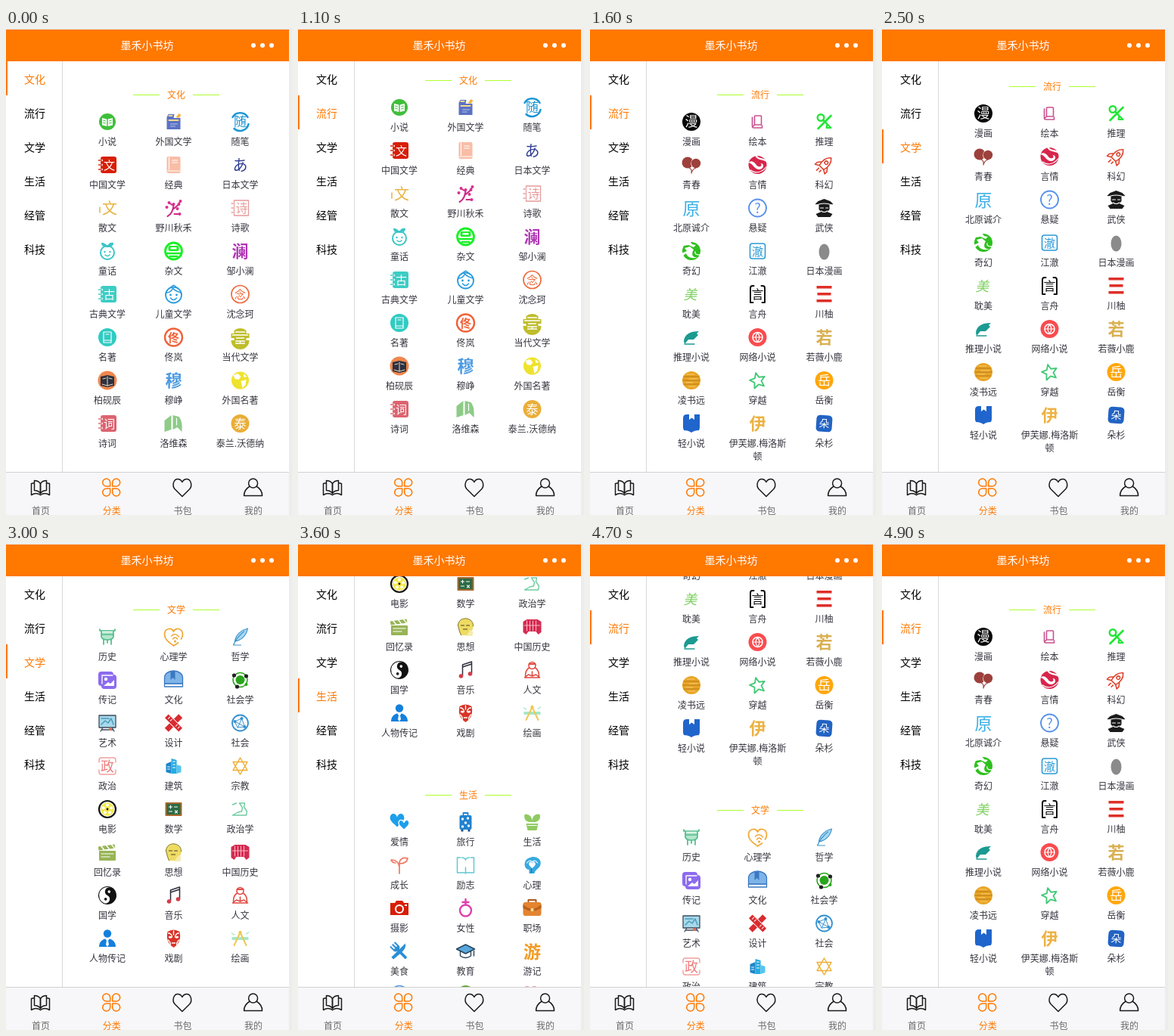
Recreate the animation shown at these times as an HTML page. Size 378 by 644 pixels, loop 6200 ms.

```html
<!DOCTYPE html>
<html lang="zh-CN">
<head>
<meta charset="utf-8">
<style>
html, body { margin: 0; width: 100%; height: 100%; overflow: hidden; background: #ececec; }
svg { display: block; width: 100%; height: 100%; }
text { font-family: "Noto Sans CJK SC", "Noto Sans CJK", "Noto Sans", sans-serif; text-anchor: middle; }
</style>
</head>
<body>
<svg id="stage" viewBox="0 0 378 644"></svg>
<script>
const LOOP = 6200, STEP = 100, PAGE_H = 543, ORANGE = '#ff7800', W = '#fff';

// Shape helpers; icons are drawn around 0,0 within about 12 units
const P = (d, c) => `<path d="${d}" fill="${c}"/>`;
const L = (d, c, w = 1.5) => `<path d="${d}" fill="none" stroke="${c}" stroke-width="${w}" stroke-linecap="round" stroke-linejoin="round"/>`;
const C = (x, y, r, c) => `<circle cx="${x}" cy="${y}" r="${r}" fill="${c}"/>`;
const O = (x, y, r, c, w = 1.5) => `<circle cx="${x}" cy="${y}" r="${r}" fill="none" stroke="${c}" stroke-width="${w}"/>`;
const R = (x, y, w, h, c, r = 0) => `<rect x="${x}" y="${y}" width="${w}" height="${h}" rx="${r}" fill="${c}"/>`;
const G = (tf, s) => `<g transform="${tf}">${s}</g>`;
const text = (s, x, y, size, c, bold = 400) =>
  `<text x="${x}" y="${y + size * .38}" font-size="${size}" font-weight="${bold}" fill="${c}">${s}</text>`;
const T = (s, size, c, bold = 400, x = 0) => text(s, x, 0, size, c, bold);
const at = (x, y, s) => G(`translate(${x} ${y})`, s);
const spin = (a, s) => G(`rotate(${a})`, s);
const mirror = s => s + G('scale(-1 1)', s);

const heart = (x, y, s) => {
  const n = (...v) => v.map(k => (k * s).toFixed(2)).join(' ');
  return `M${x} ${y + s}c${n(-.5, -.5, -1.1, -.9, -1.1, -1.4)}c${n(0, -.8, .9, -.9, 1.1, -.1)}` +
    `c${n(.2, -.8, 1.1, -.7, 1.1, .1)}c${n(0, .5, -.6, .9, -1.1, 1.4)}z`;
};
const disc = (ch, c, size = 16, r = 12) => C(0, 0, r, c) + T(ch, size, W);
const ring = (ch, c, w = 1.5, bold = 400, size = 15) => O(0, 0, 11.5, c, w) + T(ch, size, c, bold);
const binding = c => [-6, 0, 6].map(y => R(-12, y - 1.2, 6, 2.4, W, 1) + R(-12, y - .7, 5, 1.4, c)).join('');
const notebook = (ch, c) => R(-9, -11, 21, 22, c, 3) + binding(c) + T(ch, 15, W, 500, 2.5);

const pages = [
  ['文化', [
    ['小说', C(0, 0, 11, '#3fbf3a') + P('M-7-5L-.7-3.5V6L-7 4.5ZM7-5L.7-3.5V6L7 4.5Z', W) + mirror(L('M-5.5-2L-2.5-1M-5.5 1L-2.5 2', '#3fbf3a', 1))],
    ['外国文学', P('M-9-6L-7-10H1L0-5H9V10H-9Z', '#5b72c4') + P('M3-6L7-11L10-9L7-5Z', '#f2b54a') + L('M-6-8H-2M-6-2H6', '#f6d98b', 2) + L('M-4 3H5M-4 6H2', '#b9c5f0', 1)],
    ['随笔', L('M-10-6A11.5 11.5 0 0 1 10-6M11 3A11.5 11.5 0 0 1-8 9', '#1c96d4', 2.5) + T('随', 17, '#1c96d4', 500)],
    ['中国文学', notebook('文', '#d81e06')],
    ['经典', R(-9, -11, 18, 22, '#f9bda6', 2) + L('M-6-10V6M-2-6H5M-2-3H5M-8 8H8', W, 1.2)],
    ['日本文学', T('あ', 20, '#2f3d91', 500)],
    ['散文', T('文', 20, '#e8b23f', 500, 3) + L('M-10-1V6', '#e8b23f', 1.5)],
    ['野川秋禾', L('M-8 11C-2 8-1 2 0-3L-5-6M-1 2L6-4L9-9M1 8H6', '#c92a86', 2) + [[-6, -7], [-9, -1], [0, -5], [7, -5], [9, -9], [5, 1], [8, 8]].map(p => C(...p, 2, '#d9308f')).join('')],
    ['诗歌', L('M-8-10H11V10H-8Z', '#e69a9a', 1.3) + binding('#e69a9a') + T('诗', 16, '#e69a9a', 400, 2)],
    ['童话', O(0, 2, 9, '#3cc4c8', 2) + P('M0-5C-6-5-8-8-8-11C-4-11-1-9 0-6C1-10 4-12 8-11C8-7 5-5 0-5Z', '#3cc4c8') + mirror(C(-3.5, 1, 1.2, '#3cc4c8')) + L('M-3 5Q0 8 3 5', '#3cc4c8')],
    ['杂文', O(0, 0, 11, '#19f026', 2.8) + R(-7, -7, 14, 7, '#19f026', 2) + R(-4, -5, 8, 2.5, W) + L('M-9 3H9M-5 7H5', '#19f026', 2.4)],
    ['邹小澜', T('澜', 22, '#b034b4', 700)],
    ['古典文学', notebook('古', '#3dcdc4')],
    ['儿童文学', O(0, 1, 10.5, '#2a9bdd', 1.8) + L('M-10-2C-5-2-2-5-1-8C2-4 6-3 10-2M-3-10L0-12L3-10M-4 5Q0 10 4 5', '#2a9bdd') + mirror(C(-4, 1, 1.4, '#2a9bdd'))],
    ['沈念珂', ring('念', '#ef693b', 1.7)],
    ['名著', C(0, 0, 12, '#30cbc2') + L('M-5-7H5V7H-5ZM-5 4H5M-2-4H2', W, 1.2)],
    ['佟岚', ring('佟', '#f0623a', 2.4, 700)],
    ['当代文学', P('M-8-9A12 12 0 0 1 8-9V-5H12V1H8V4H12A12 12 0 0 1-12 4H-8V1H-12V-5H-8Z', '#bfbd2b') + L('M-6-7H6M-10-3H10M-5 1H5M-6 5H6M-6 8H6M0 5V8', W, 1.3)],
    ['柏砚辰', C(0, 0, 12.5, '#f0874d') + P('M-9-5L0-7L9-5V7L0 9L-9 7Z', '#2b3140') + L('M0-5V7M-6-2L-2-3M6-2L2-3M-7 5L0 7L7 5', '#f3d9c0', 1)],
    ['穆峥', T('穆', 22, '#4c9be2', 700)],
    ['外国名著', C(0, 0, 11.5, '#eee32c') + P('M-9-7L-3-9L1-5L-2-1L-7-2ZM1 1L8-1L7 6L3 10ZM4-9L9-5L5-4Z', W)],
    ['诗词', notebook('词', '#dc6470')],
    ['洛维森', P('M-12-4L-3-11V8L-12 11ZM-1-11L7-9Q12-4 11 11L5 5L-1 8Z', '#8ecb88') + L('M4-7V2', W, 1.2)],
    ['泰兰.沃德纳', disc('泰', '#eaae38')]
  ]],
  ['流行', [
    ['漫画', disc('漫', '#080808', 17)],
    ['绘本', L('M-3-8H4Q5-8 5-7V4H-4V-7Q-4-8-3-8ZM-7-6V6Q-7 8-5 8H6V5M-4 4L-6 6', '#c9528f', 1.6)],
    ['推理', O(-4.5, -5.5, 4.3, '#22e636', 2.4) + L('M9-8L-8 9M-1-2L3 2', '#22e636', 2.6) + L('M4 3L9 8H3Z', '#22e636', 2)],
    ['青春', C(-5, -3, 7.5, '#9d403c') + C(6, -2, 6.8, W) + C(6, -2, 6.2, '#9d403c') + L('M-3 4Q1 5 0 11M6 4Q1 6 0 11', '#9d403c', 1.2)],
    ['言情', C(0, 0, 12, '#d7264c') + P('M-12-3C-6-2-4 7 3 6C9 5 9-2 4-2C7 1 3 4-1 1C-4-4-8-7-12-3Z', W) + L('M-2-12C1-6 7-9 12-5', W, 2.2) + L('M-9 7C-3 12 6 10 11 3', W, 1.2)],
    ['科幻', spin(45, L('M0-13C6-8 6-2 4 5H-4C-6-2-6-8 0-13ZM-5-1L-9 4V8L-4 5M5-1L9 4V8L4 5M-2 8V12M2 8V11', '#de432d', 1.6) + O(0, -4, 2.2, '#de432d'))],
    ['北原诚介', T('原', 23, '#3db0e6')],
    ['悬疑', ring('?', '#5c93ea', 1.9, 500, 18)],
    ['武侠', P('M0-12L8-9L12-5L7-4V2L4 5L11 8L8 12H-8L-11 8L-4 5L-7 2V-4L-12-5L-8-9Z', '#1b1b1b') + L('M-10-4Q0-8 10-4M-5 0H-1M2 0H5M-4 4Q0 7 4 4', W, 1.2)],
    ['奇幻', C(0, 0, 12, '#2dc01c') + P('M-13 3L-6 0L-9-4L-2-6L3-2C-1 5 2 9 8 8C2 11-6 8-7 3L-12 7Z', W) + P('M-2-13L1-9L6-8L3-5L-4-8L-10-7L-9-12Z', W) + L('M5 1Q4 5 11 5', W, 1.3)],
    ['江澈', L('M-7-10H7Q10-10 10-7V7Q10 10 7 10H-7Q-10 10-10 7V-7Q-10-10-7-10Z', '#2c9bd6', 1.6) + T('澈', 15, '#2c9bd6')],
    ['日本漫画', '<ellipse cy="1" rx="7" ry="10.5" fill="#8b8b8b"/>'],
    ['耽美', G('skewX(-12)', T('美', 18, '#7ed160'))],
    ['言舟', L('M-5-11H-7Q-9.5-11-9.5-8V11H-6M5-11H7Q9.5-11 9.5-8V11H6', '#111', 2) + T('言', 16, '#111', 500)],
    ['川柚', R(-10, -11, 20, 3.5, '#df2f28') + R(-9, -2, 18, 3.5, '#df2f28') + R(-10, 7, 20, 3.5, '#df2f28')],
    ['推理小说', P('M-10 5C-9-4-2-8 10-8L7-5L9-3L3 3H-4L-9 9Z', '#1b9a92') + L('M-9 9H4', '#1b9a92', 1.3)],
    ['网络小说', C(0, 0, 12, '#f94c4f') + O(0, 0, 6.5, W) + L('M-6 0H6M0-6Q-5 0 0 6M0-6Q5 0 0 6', W, 1.2)],
    ['若薇小鹿', T('若', 22, '#d9b052', 700)],
    ['凌书远', C(0, 0, 12, '#e9a424') + L('M-10-5H10M-11 0H11M-10 5H10', '#b87b19', 1.2) + L('M-6-8H4M-3-2H8M-7 3H2M-4 8H5', '#f6cd70', 1)],
    ['穿越', G('rotate(-14) scale(.92)', L('M0-11L3-4L11-3L5 2L7 10L0 6L-7 10L-5 2L-11-3L-3-4Z', '#41c874', 2))],
    ['岳衡', disc('岳', '#ffa70a', 17)],
    ['轻小说', P('M-11-7Q-11-12-6-12H11V6L10 9Q4 9 0 12Q-4 9-10 9L-11 6Z', '#2065cb') + P('M-3-12H4V-5L.5-7.5L-3-5Z', W)],
    ['伊芙娜.梅洛斯|顿', T('伊', 22, '#ecb244', 700)],
    ['朵杉', spin(4, R(-10.5, -11, 21, 22, '#2263c4', 5) + T('朵', 14, W, 500))]
  ]],
  ['文学', [
    ['历史', P('M-8-6H8V0Q6 4 0 4Q-6 4-8 0Z', '#b5e5cd') + L('M-10-8H10M-8-8V0Q-7 4 0 4Q7 4 8 0V-8M-5 4L-5 10M5 4L5 10M0 4V8M-7-3H7M-10-8V-10M10-8V-10', '#4fbd8a', 1.7)],
    ['心理学', L('M6 8L0 12C-5 8-12 4-12-3C-12-11-3-13 0-7C3-13 12-11 12-3Q12 0 10 3', '#f1a93a', 1.8) + L('M-3-1Q2-6 7 0M-1 3Q2-1 5 3', '#f1a93a') + C(2, 6, 1.6, '#f1a93a')],
    ['哲学', P('M10-11C2-9-6-3-7 6C1 5 8-1 10-11Z', '#a9d8f2') + L('M10-11C2-9-6-3-7 6C1 5 8-1 10-11ZM-9 11C-5 2 0-3 5-7M-9 11H1', '#3c94cb', 1.2)],
    ['传记', R(-12, -11, 20, 19, '#8c6bef', 4) + R(-8, -7, 20, 19, '#8c6bef', 4) + L('M-7-6H7M-7-6V5', W, 1.3) + C(-2, -1, 2.2, W) + P('M-5 8L1 3L4 5L9 0V8Z', W)],
    ['文化', P('M-12 6V-3A12 9 0 0 1 12-3V6Z', '#7fb4e8') + L('M-12 9V-3A12 9 0 0 1 12-3V9ZM-12 5H12', '#3a78c2', 1.3) + P('M-4-11H2V0L-1-3L-4 0Z', '#3a78c2')],
    ['社会学', C(0, 0, 6, '#29a51b') + O(0, 0, 9.5, '#29a51b', 1.6) + C(-8, -6, 2.6, '#222') + C(8, -5, 2.6, '#222') + C(-4, 9, 2.6, '#222') + C(8, 6, 2, '#29a51b')],
    ['艺术', R(-11, -10, 22, 16, '#a6d9ec') + L('M-11-10H11V6H-11ZM-6 6L-9 11M6 6L9 11M-8 9H8', '#3f4c5a', 1.3) + L('M-8-6H2M-8 2L-3-3L1 0L5-6L8 2', '#4f9bb8') + C(4, 8, 2, '#e07060')],
    ['设计', spin(45, R(-3.5, -13, 7, 26, '#d92b30')) + spin(-45, R(-4.2, -13, 8.4, 26, W) + R(-3.3, -13, 6.6, 26, '#d92b30') + L('M-1-9H2M-1-5H2M-1 5H2M-1 9H2', W, 1))],
    ['社会', O(0, 0, 10.5, '#3590cf', 1.8) + L('M-7-2L2-6L6 5L-3 6ZM2-6L-3 6M-7-2L6 5', '#3590cf', 1) + C(2, -6, 2, '#3590cf') + C(-7, -2, 2, '#3590cf') + C(6, 5, 2, '#3590cf')],
    ['政治', L('M-11-5V-8Q-11-11-8-11H8Q11-11 11-8V-5M11 5V8Q11 11 8 11H-8Q-11 11-11 8V5', '#f1a0a0', 1.4) + T('政', 18, '#ee7d7d')],
    ['建筑', P('M-10-3L-3-6V10L-10 8Z', '#1c86c9') + P('M-3-10L4-8V10H-3Z', '#27aae2') + P('M4-2L10 0V8L4 10Z', '#56c5ee') + L('M-1-6H2M-1-2H2M-1 2H2M-8 1H-5M-8 4H-5', W, 1)],
    ['宗教', L('M0-11L9.5 5.5H-9.5ZM0 11L9.5-5.5H-9.5Z', '#efaf35', 1.5)],
    ['电影', O(0, 0, 11, '#141414', 2.2) + C(0, 0, 8.8, '#f5e94a') + [0, 72, 144, 216, 288].map(a => spin(a, C(0, -5.5, 2, W))).join('') + C(0, 0, 1.4, '#141414')],
    ['数学', R(-11, -9, 22, 18, '#a8692f', 1) + R(-9, -7, 18, 14, '#2c6a45') + L('M-6-3H-2M-4-5V-1M1-3H5M-6 3H-2M2 2L5 5M5 2L2 5', W, 1.1)],
    ['政治学', L('M-10-6L-5-8M-1-8H6L5-3L9 3L8 8H-10L-3 4L2 3L3-2L-1-8', '#6fcca0', 1.4)],
    ['回忆录', R(-11, -2, 22, 13, '#98b457', 1) + spin(-8, R(-11, -9, 22, 5, '#98b457') + L('M-7-9L-4-4M0-9L3-4M7-9L10-4', W, 1.5)) + L('M-8 2H8M-8 6H3', W, 1.2)],
    ['思想', P('M-10-2C-10-15 11-14 10-1C10 5 6 7 5 11H-6L-8 6Z', '#eedb62') + L('M-10-2C-10-15 11-14 10-1M-10-2L-8 6L-6 11', '#7f7434', 1) + L('M-6-2H-2M1-2H5M-3 3H2', '#4a4428', 1.2) + P('M1 12L6 4L10 6L9 12Z', '#f5ecae')],
    ['中国历史', P('M-12-7L-7-10H7L12-7V7L8 10L5 6H-5L-8 10L-12 7Z', '#d52a50') + L('M-7-8V5M-3-8V5M1-8V5M5-8V5M-10-2H10', '#f7b7c5', 1)],
    ['国学', spin(25, C(0, 0, 12, '#111') + P('M0-11A11 11 0 0 0 0 11A5.5 5.5 0 0 0 0 0A5.5 5.5 0 0 1 0-11Z', W) + C(0, -5.5, 1.8, W) + C(0, 5.5, 1.8, '#111'))],
    ['音乐', L('M-4 7V-7L8-11V4M-4-4L8-8', '#2d2f3c', 1.5) + C(-6, 8, 2.8, '#d43d48') + C(6, 5, 2.8, '#d43d48')],
    ['人文', O(0, -6, 4.5, '#e04a40', 1.6) + L('M-4-3Q-9 0-9 8M4-3Q9 0 9 8M-10 10L-5 6L0 8L5 6L10 10ZM0 8V2', '#e04a40', 1.6) + L('M-4-8H4', '#e04a40', 2)],
    ['人物传记', C(0, -6.5, 5.2, '#1480dc') + P('M-11 11C-11 4-6 0 0 0C6 0 11 4 11 11Z', '#1480dc') + P('M-3 0H3L1 3L2 8L0 11L-2 8L-1 3Z', W)],
    ['戏剧', P('M-8-9Q0-14 8-9Q11 5 0 12Q-11 5-8-9Z', '#d93429') + mirror(L('M-7-7Q-3-7-2-2M-7 2Q-4 5-4 8', W, 1.3) + P('M-7-2Q-4-5-2-1Q-5 1-7-2Z', W)) + L('M0-10V-5M-2 6H2', W, 1.4)],
    ['绘画', R(-11, -2, 22, 4, '#a5e8c8') + L('M0-8L-8 9M0-8L8 9', '#f1c755', 2) + C(0, -8, 2.2, '#f1c755') + L('M-11-7L-8-5M8-6L11-8', '#a5e8c8', 1.5)]
  ]],
  ['生活', [
    ['爱情', P(heart(-3, -2, 8.5), '#1d9fec') + `<path d="${heart(6, 4, 6.3)}" fill="#1d9fec" stroke="#fff" stroke-width="1.3"/>`],
    ['旅行', L('M-3-9V-12H3V-9', '#2183cf', 1.8) + R(-8, -9, 16, 19, '#2183cf', 2) + R(-6, 10, 3, 2.5, '#174e86') + R(3, 10, 3, 2.5, '#174e86') + [[-4, -4], [3, -5], [0, 1], [-4, 6], [4, 5]].map(p => C(...p, 1.7, W)).join('')],
    ['生活', P('M0 0C-10 1-11-6-10-10C-4-11 0-7 0-1C0-8 5-12 10-10C12-4 8 1 0 0Z', '#8fca62') + P('M-8 2H8L6 11H-6Z', '#8fca62') + L('M-6 4.5H6', W, 1)],
    ['成长', L('M0 11V-2C0-8 5-11 11-9C10-4 5-2 0-2M0 2C-1-4-5-7-11-7C-10-4-8-3-5-3', '#ee7862', 1.7)],
    ['励志', L('M-7-10H-11V10H-6Q-1 9 0 11Q1 9 6 10H11V-10H7M0 3V11M-5-10Q-1-10 0-7Q1-10 5-10', '#62c9d1', 1.5)],
    ['心理', P('M-3-10C4-13 13-8 11-1C10 5 4 5 3 11H-4V6C-11 6-13-7-3-10Z', '#38a9df') + L('M-7-3Q-3-8 0-4Q4-8 7-3', W, 1.2) + P(heart(0, 0, 4), W) + L('M-1 5V10', '#1c72a8', 1.2)],
    ['摄影', P('M-12-7H-6L-4-10H4L6-7H12V9H-12Z', '#d81e06') + C(0, 1, 6, W) + C(0, 1, 4, '#d81e06') + R(7, -5, 3, 2, W)],
    ['女性', O(0, 3, 7.5, '#e03fae', 2.4) + L('M0-5V-12M-4-8H4', '#e03fae', 2.4)],
    ['职场', L('M-5-8V-11H5V-8', '#a95a21', 2) + R(-12, -8, 24, 18, '#e4842f', 3) + P('M-12-5Q0 6 12-5V0Q0 7-12 0Z', '#b8611f') + R(-2, 0, 4, 4, '#f9d594', 1)],
    ['美食', spin(-45, R(-1.8, -4, 3.6, 17, '#2b8fd5', 1.5) + P('M-5-13H-3V-7H-1V-13H1V-7H3V-13H5V-5Q4-2 0-2Q-4-2-5-5Z', '#2b8fd5')) + spin(45, P('M-2-13Q4-10 3 1L2 13H-2Z', '#2b8fd5'))],
    ['教育', P('M0-9L12-3L0 3L-12-3Z', '#56a8dc') + L('M0-9L12-3L0 3L-12-3ZM-7 0V6Q0 11 7 6V0M11-3V6', '#28445d', 1.4)],
    ['游记', T('游', 23, '#f29b23', 700)],
    ['灵修', ring('灵', '#4b90df', 1.3)],
    ['健康', C(0, 0, 12, '#67a832') + L('M-6 0H6M0-6V6', W, 3.5)],
    ['情感', L(heart(-2, -1, 8.5), '#ec7070', 1.5) + P(heart(7, 4, 4.8), '#ec6565')],
    ['手工', mirror(P('M0 0C-3-8-9-10-11-8C-11-2-7 1 0 1Z', '#7f9dc5') + P('M0 1C-7 1-9 5-7 9C-3 9-1 5 0 1Z', '#dfc7a0') + L('M0 0C-3-8-9-10-11-8C-11-2-7 1 0 1C-7 1-9 5-7 9C-3 9-1 5 0 1M0-3L-3-9', '#2e3752', 1.2)) + L('M0-3V8', '#2e3752', 2)],
    ['两性', C(0, 0, 12.5, '#c695d1') + C(-4, -6, 2.3, W) + C(4, -6, 2.3, W) + R(-6.5, -3, 5, 6, W, 1) + R(-5.5, 2, 3, 6, W) + P('M3-3H5L8 4H6V8H2V4H0Z', W)],
    ['养生', P('M9-12C-6-7-12-1-9 7L-11 12H-8L-6 9C6 12 11 3 9-12Z', '#25a842') + L('M-7 8Q1 2 5-5M0 2V-4M-3 5H4', W, 1)],
    ['人际关系', mirror(C(-8, -4, 3.2, '#e5982c') + P('M-13 6Q-12 0-7 0L-4 6Z', '#e5982c')) + '<path d="M-8 10Q-8 2 0 2Q8 2 8 10Z" fill="#e5982c" stroke="#fff"/>' + C(0, -3, 5, '#e5982c')],
    ['家居', P('M-7-10H7Q9-10 9-4V0H-9V-4Q-9-10-7-10Z', '#22e022') + P('M-11-3Q-6-5-6 2H6Q6-5 11-3V7H8V10H5V7H-5V10H-8V7H-11Z', '#22e022') + L('M-8-1Q-6-1-6 3H6Q6-1 8-1', W, 1.2)],
    ['自助游', L('M-8-2L-5-10H5L8-2M-10-2H10V8H-10ZM-8 8V11H-5V8M5 8V11H8V8M-12-5H-9M9-5H12M-4 4H4', '#60c9c9', 1.6) + mirror(C(-7, 3, 1.4, '#60c9c9'))]
  ]]
];

const cols = [134, 221.5, 309.5];

function item([label, icon], i) {
  const x = cols[i % 3], y = 124 + 57 * Math.floor(i / 3);
  return at(x, y, icon) + label.split('|').map((s, k) => text(s, x, y + 26 + 17 * k, 12, '#363640')).join('');
}

const page = ([title, items], i) => `<g transform="translate(0 ${i * PAGE_H})">` +
  R(168, 88, 35, 1, '#adff2f') + R(247, 88, 35, 1, '#adff2f') + text(title, 225, 88, 12, ORANGE) + items.map(item).join('') + '</g>';

const petal = L('M-1.5-1.5H-6.5A5 5 0 1 1-1.5-6.5Z', ORANGE, 1.5);
const INK = '#1a1a1a';
const tabs = [
  ['首页', mirror(L('M0-5C-2-8-5-9-8-9V4C-5 4-2 5 0 8V-5M-8-6L-12-5V10C-7 7-3 8 0 10', INK))],
  ['分类', mirror(petal + G('scale(1 -1)', petal))],
  ['书包', L('M0 12L-10 2C-14-3-11-11-6-11Q-2-11 0-7Q2-11 6-11C11-11 14-3 10 2Z', INK)],
  ['我的', O(0, -5.5, 6, INK) + L('M-5-1C-10 2-12 6-12 11H12C12 6 10 2 5-1', INK)]
];
const sections = ['文化', '流行', '文学', '生活', '经管', '科技'];

const stage = document.getElementById('stage');
stage.innerHTML =
  R(0, 0, 378, 644, '#ececec') + R(0, 44, 374, 543, W) +
  `<g id="pages">${pages.map(page).join('')}</g>` +
  R(74, 44, 1, 543, '#d9d9d9') + R(0, 0, 378, 2, '#ececec') + R(0, 2, 374, 42, ORANGE) +
  text('墨禾小书坊', 186.5, 23, 14, W) + [327, 339, 351].map(x => C(x, 23, 3, W)).join('') +
  `<rect id="bar" y="44" width="2" height="45" fill="${ORANGE}"/>` +
  sections.map((s, i) => `<g class="section">${text(s, 38, 68 + 45 * i, 14, 'currentColor')}</g>`).join('') +
  R(0, 587, 374, 57, '#f7f7f9') + R(0, 587, 374, 1, '#d2d2d2') +
  tabs.map(([s, icon], i) => {
    const x = 46 + 93.7 * i;
    return at(x - .5, 607.5, icon) + text(s, x, 638, 12, i === 1 ? ORANGE : '#6b6b6b');
  }).join('') + R(374, 0, 4, 644, '#ececec');

const scroller = document.getElementById('pages');
const bar = document.getElementById('bar');
const labels = stage.querySelectorAll('.section');

// Visible from, motion start, duration, target page
const moves = [[1100, 976, 600, 1], [2500, 2397, 600, 2], [3400, 3290, 600, 3], [4400, 4400, 500, 1]];
const ease = u => u < .5 ? 4 * u ** 3 : 1 - 4 * (1 - u) ** 3;

function draw(time) {
  const t = Math.floor((time % LOOP) / STEP) * STEP;
  let pos = 0, tab = 0;
  for (const [from, start, dur, to] of moves) {
    if (t < from) break;
    pos += (to - pos) * ease(Math.min(1, (t - start) / dur));
    tab = to;
  }
  scroller.setAttribute('transform', `translate(0 ${Math.round(-pos * PAGE_H)})`);
  bar.setAttribute('y', 44 + 45 * tab);
  labels.forEach((g, i) => g.setAttribute('color', i === tab ? ORANGE : '#000'));
}

const begin = performance.now();
(function tick() {
  draw(performance.now() - begin);
  requestAnimationFrame(tick);
})();
</script>
</body>
</html>
```
